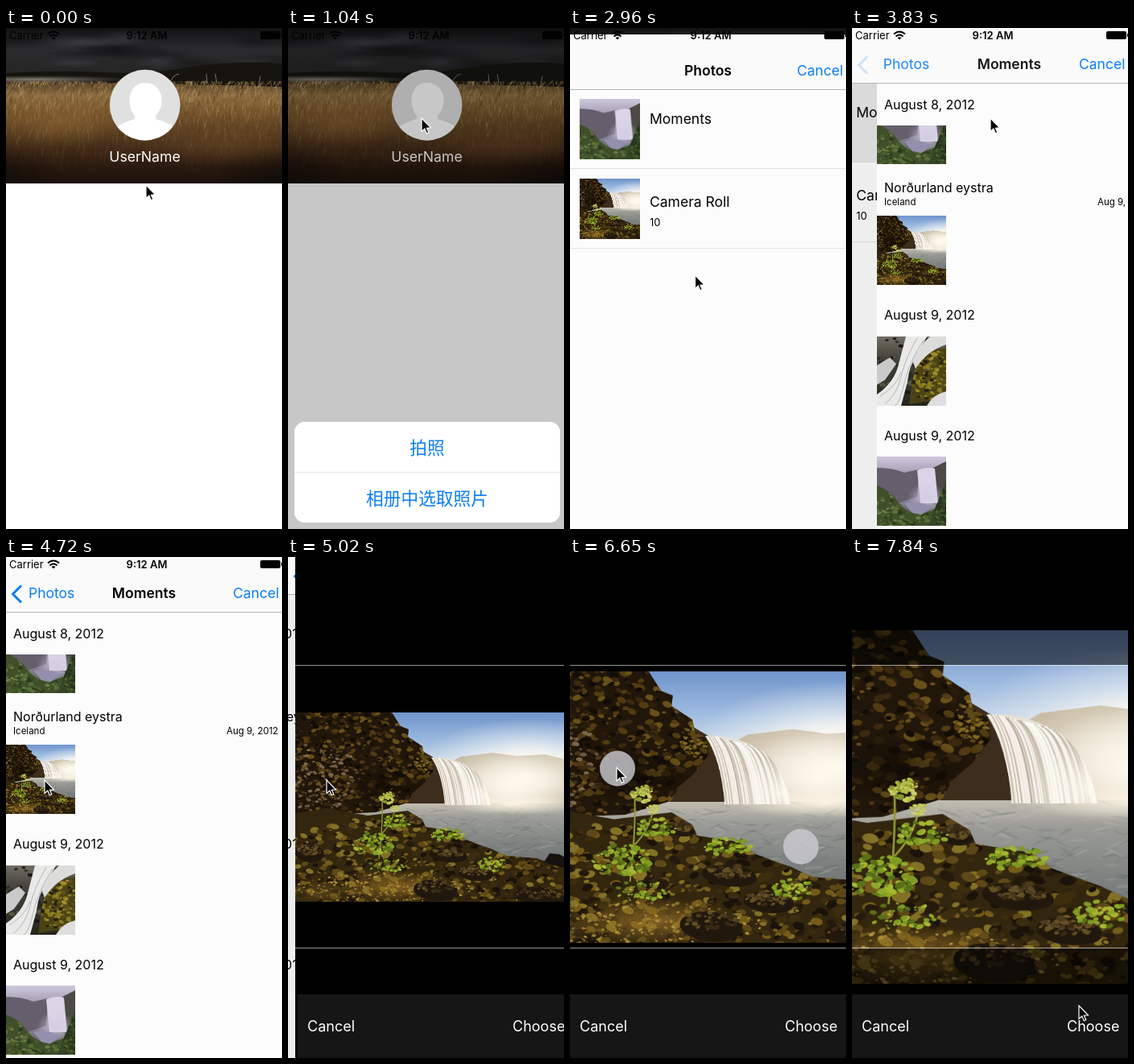
Write an HTML page with a canvas that moves like this. It is 343x622 px and loops after 7.99 s.

```html
<!DOCTYPE html>
<html lang="en">
<head>
<meta charset="utf-8">
<title>Avatar picker</title>
<style>
html, body { margin: 0; width: 100%; height: 100%; overflow: hidden; background: #fff; }
#stage { position: absolute; left: 0; top: 0; width: 343px; height: 622px; overflow: hidden; background: #fff;
  font: 400 18px/20px Inter, Roboto, sans-serif; color: #000; }
#stage * { position: absolute; box-sizing: border-box; white-space: nowrap; }
#stage svg * { position: static; }
.page { left: 0; top: 0; width: 343px; height: 622px; overflow: hidden; background: #fcfcfc; }
canvas { left: 0; }
.blue { color: #0b7df5; }
.mid { left: 0; width: 343px; text-align: center; }
.bold { font-weight: 600; }
.date { left: 9px; font-size: 16px; }
.small { font-size: 11.5px; }

#shade { left: 0; top: 0; width: 343px; height: 622px; background: #000; }
#sheet { left: 8px; top: 419px; width: 330px; height: 196px; color: #0b7df5; text-align: center;
  font: 400 21.7px/62px "Noto Sans CJK SC", "Noto Sans CJK", sans-serif; }
#sheet div { width: 330px; background: #fff; }
#sheet .box { height: 125px; border-radius: 13px; overflow: hidden; }
#row { top: 63px; height: 62px; box-shadow: 0 -1px #e6e6e6; }
#sheet .no { top: 134px; height: 61px; border-radius: 13px; font-weight: 600; }

#albums .cell { left: 0; width: 343px; height: 99px; border-bottom: 1px solid #e2e2e2; }
#nav { left: 0; top: 0; width: 343px; background: #fafafa; border-bottom: 1px solid #b4b4b4; overflow: hidden; }
#bar { left: 0; width: 343px; height: 50px; bottom: -2px; }
#bar > * { top: 15px; font-size: 17.5px; }

#crop { background: #000; }
#photo { left: 0; top: 193px; width: 343px; height: 235px; }
.veil { left: 0; width: 343px; background: rgba(0,0,0,.55); }
.rule { left: 0; width: 343px; height: 1px; background: rgba(255,255,255,.58); }
#tools { left: 0; top: 543px; width: 343px; height: 79px; background: #161616; color: #fff; }
.touch { left: -22px; top: -22px; width: 44px; height: 44px; border-radius: 50%; background: rgba(205,205,210,.8); }
</style>
</head>
<body>
<div id="stage">
  <div class="page" id="profile" style="background:#fff">
    <canvas id="field" style="top:0"></canvas>
    <svg style="left:128px;top:51px" width="90" height="90" viewBox="128 51 90 90">
      <clipPath id="disc"><circle cx="172.7" cy="95.6" r="43.8"/></clipPath>
      <g clip-path="url(#disc)">
        <path fill="#e0e0e0" d="M128 51h90v90h-90z"/>
        <path fill="#fff" d="M173 68C186 68 193.500 78 193.500 90C193.500 98 190 105 186 109V113Q203 118 208 123V141H138V123Q143 118 160 113V109C156 105 153.500 98 153.500 90C153.500 78 160 68 173 68Z"/>
      </g>
    </svg>
    <div class="mid" style="left:1px;top:150px;color:#fff;font-size:17.6px">UserName</div>
  </div>
  <div id="shade"></div>
  <div id="sheet" lang="zh-CN">
    <div class="box"><div>拍照</div><div id="row">相册中选取照片</div></div>
    <div class="no">取消</div>
  </div>

  <div class="page" id="picker">
    <div class="page" id="albums">
      <div class="cell" id="cell" style="top:68px">
        <canvas id="album1" style="left:12px;top:12px"></canvas>
        <div style="left:99px;top:27px;font-size:17.5px">Moments</div>
      </div>
      <div class="cell" style="top:167px">
        <canvas id="album2" style="left:12px;top:12px"></canvas>
        <div style="left:99px;top:31px;font-size:17.5px">Camera Roll</div>
        <div style="left:99px;top:56px;font-size:13px">10</div>
      </div>
    </div>
    <div class="page" id="moments">
      <canvas id="thumb1" style="top:83px;clip-path:inset(38px 0 0)"></canvas>
      <canvas id="thumb2" style="top:233px"></canvas>
      <canvas id="thumb3" style="top:383px"></canvas>
      <canvas id="thumb4" style="top:532px"></canvas>
      <div class="date" style="top:85px">August 8, 2012</div>
      <div class="date" style="top:188px">Norðurland eystra</div>
      <div class="small" style="left:9px;top:206px">Iceland</div>
      <div class="small" style="left:274px;top:206px">Aug 9, 2012</div>
      <div class="date" style="top:346px">August 9, 2012</div>
      <div class="date" style="top:496px">August 9, 2012</div>
    </div>
    <div id="nav"><div id="bar">
      <svg id="chevron" style="left:6px;top:14px" width="15" height="24"><path d="M13 1.500L2.500 12L13 22.500" fill="none" stroke="#0b7df5" stroke-width="3"/></svg>
      <div id="back" class="blue" style="left:28px">Photos</div>
      <div id="title1" class="mid bold">Photos</div>
      <div id="title2" class="mid bold">Moments</div>
      <div class="blue" style="left:282px">Cancel</div>
    </div></div>
  </div>

  <div id="status" style="left:0;top:-1px;width:343px;height:20px;font-size:13px">
    <div style="left:4px">Carrier</div>
    <svg style="left:51px;top:4px" width="16" height="12" fill="none" stroke="#000" stroke-width="2"><path d="M1 4.500Q8 -1.500 15 4.500M3.500 7.500Q8 3.500 12.500 7.500"/><path d="M5.500 9L8 11.500L10.500 9Q8 7.500 5.500 9Z" fill="#000" stroke="none"/></svg>
    <div class="mid bold" style="left:3.500px">9:12 AM</div>
    <div style="left:316px;top:5px;width:25px;height:10px;border-radius:2px;background:#000"></div>
    <div style="left:342px;top:8px;width:1px;height:4px;background:#000"></div>
  </div>

  <div class="page" id="crop">
    <canvas id="photo"></canvas>
    <div class="veil" style="top:0;height:134px"></div>
    <div class="veil" style="top:486px;height:57px"></div>
    <div class="rule" style="top:134px"></div>
    <div class="rule" style="top:485px"></div>
    <div id="tools">
      <div style="left:12px;top:30px">Cancel</div>
      <div style="left:267px;top:30px">Choose</div>
    </div>
  </div>
  <div class="touch" id="touch1"></div>
  <div class="touch" id="touch2"></div>
  <svg id="cursor" style="left:-2px;top:-2px" width="18" height="24" viewBox="-2 -2 18 24">
    <path d="M0 0V16.500L3.800 13L6.300 18.800L8.800 17.700L6.400 12.200L11.500 11.800Z" fill="#000" stroke="#fff" stroke-width="1.200"/>
  </svg>
</div>
<script>
const $ = id => document.getElementById(id);

// ---- painting helpers ----
let seed = 7;
const rnd = () => {
  seed = seed + 0x6D2B79F5 | 0;
  let t = Math.imul(seed ^ seed >>> 15, 1 | seed);
  t = t + Math.imul(t ^ t >>> 7, 61 | t) ^ t;
  return ((t ^ t >>> 14) >>> 0) / 4294967296;
};
const pick = list => list[Math.floor(rnd() * list.length)];

function canvas(id, w, h, scale = 1) {
  const c = $(id), g = c.getContext('2d');
  c.width = w * scale; c.height = h * scale;
  c.style.width = w + 'px'; c.style.height = h + 'px';
  g.scale(scale, scale);
  return g;
}
function ramp(g, x, y, w, h, stops) {
  const f = g.createLinearGradient(0, y, 0, y + h);
  stops.split(' ').forEach(s => { const [at, color] = s.split(':'); f.addColorStop(+at, color); });
  g.fillStyle = f;
  g.fillRect(x, y, w, h);
}
function glow(g, x, y, rx, ry, rgb, a) {
  const f = g.createRadialGradient(0, 0, 0, 0, 0, 1);
  f.addColorStop(0, `rgba(${rgb},${a})`);
  f.addColorStop(1, `rgba(${rgb},0)`);
  g.save(); g.translate(x, y); g.scale(rx, ry);
  g.fillStyle = f; g.fillRect(-1, -1, 2, 2);
  g.restore();
}
// Fills a shape, then draws details clipped to it.
function shape(g, fill, d, details) {
  const p = new Path2D(d);
  g.fillStyle = fill; g.fill(p);
  if (details) { g.save(); g.clip(p); details(); g.restore(); }
}
function specks(g, n, x, y, rx, ry, size, colors, flat = .6) {
  for (let i = 0; i < n; i++) {
    const a = rnd() * 6.283, d = Math.sqrt(rnd()), s = size * (.4 + rnd());
    g.fillStyle = pick(colors);
    g.beginPath();
    g.ellipse(x + Math.cos(a) * d * rx, y + Math.sin(a) * d * ry, s, s * flat, rnd() - .5, 0, 6.283);
    g.fill();
  }
}

function paintField(g) {
  ramp(g, 0, 0, 343, 193, '0:#121214 .14:#2b2b2e .27:#262626 .34:#2b2620 .36:#5c4a2e .43:#8b6c40 .55:#74532b .72:#4c341b .88:#2c1b10 1:#1c110b');
  for (let i = 0; i < 16; i++) glow(g, rnd() * 343, 12 + rnd() * 36, 30 + rnd() * 30, 5 + rnd() * 8, pick(['72,73,79', '14,14,16']), .45);
  shape(g, '#15140f', 'M0 56Q60 52 120 55T230 48Q290 40 343 44V73Q180 68 0 66Z');
  glow(g, 35, 64, 120, 5, '170,160,145', .75);
  for (let i = 0; i < 1900; i++) {
    const d = rnd(), x = rnd() * 343, y = 69 + d * d * 112, len = 3 + d * 9;
    g.globalAlpha = .5 * (1.05 - d);
    g.strokeStyle = pick(['#c49f62', '#a37a42', '#5a3c1b', '#3a2612', '#dcbd82']);
    g.beginPath(); g.moveTo(x, y);
    g.quadraticCurveTo(x + 1, y - len * .6, x + (rnd() - .3) * 6, y - len);
    g.stroke();
  }
  g.globalAlpha = 1;
  glow(g, 70, 118, 80, 30, '168,120,62', .35);
  glow(g, 270, 145, 110, 28, '130,90,48', .3);
  glow(g, 343, 190, 90, 42, '14,9,6', .75);
  glow(g, 0, 185, 70, 45, '18,11,7', .7);
  g.strokeStyle = 'rgba(225,215,195,.6)'; g.lineWidth = .8;
  g.stroke(new Path2D('M203 70Q207 58 215 57M250 69L249 57M262 69L260 57M313 75L316 60'));
}

function paintFalls(g) {
  ramp(g, 0, 0, 343, 120, '0:#7094cb .3:#9dbbe0 .55:#d5e0ea 1:#f4efe6');
  glow(g, 290, 60, 130, 52, '255,252,246', 1);
  shape(g, '#c5b8a0', 'M190 64L205 55L245 50L275 54L310 52L343 60V115H190Z');
  glow(g, 285, 82, 110, 44, '255,250,240', 1);
  glow(g, 268, 92, 70, 40, '255,249,238', 1);
  shape(g, '#3d2d1d', 'M138 36L172 56L182 62L190 116H138Z');
  ramp(g, 0, 113, 343, 90, '0:#c3bdb1 .2:#9b9c97 .6:#7c807e 1:#686c69');
  specks(g, 260, 230, 145, 130, 32, 6, ['rgba(200,200,195,.2)', 'rgba(80,88,88,.18)'], .12);
  glow(g, 272, 114, 85, 13, '255,246,230', .95);
  shape(g, '#e9e1d5', 'M169 56Q190 55 207 63Q234 72 243 115H186Q183 76 169 56Z', () => {
    for (let i = 0; i < 42; i++) {
      const u = i / 42 + rnd() * .02;
      g.strokeStyle = pick(['rgba(150,136,118,.4)', 'rgba(255,255,252,.75)']);
      g.beginPath(); g.moveTo(170 + u * 50, 55 + u * 12);
      g.quadraticCurveTo(181 + u * 56, 70, 186 + u * 57, 116);
      g.stroke();
    }
    glow(g, 238, 105, 42, 32, '255,250,242', .9);
  });
  shape(g, '#20160a', 'M0 0H120L131 17L141 21L140 30L158 42L160 52L170 58L172 72L160 88L146 100L140 112L100 124L0 128Z', () => {
    specks(g, 650, 80, 58, 110, 75, 3.4, ['#3a280f', '#523b12', '#120d07', '#2b1d0b', '#695019']);
    specks(g, 260, 25, 80, 55, 42, 2.2, ['#6b563d', '#45351f', '#1c140b', '#7d6749']);
    glow(g, 110, 92, 50, 22, '14,9,4', .6);
    specks(g, 90, 160, 60, 12, 14, 1.5, ['#836a20', '#5c4716']);
  });
  shape(g, '#33260e', 'M0 125L40 119L90 128L140 122L158 133L162 142L200 148L212 158L245 170L262 178L300 181L343 196V235H0Z', () => {
    specks(g, 1000, 160, 190, 200, 62, 4, ['#5e4817', '#1a1309', '#745b1a', '#3c2d0f', '#241a0c', '#837126']);
    glow(g, 125, 216, 75, 20, '156,116,40', .75);
    glow(g, 30, 222, 60, 16, '110,84,30', .6);
    specks(g, 260, 110, 218, 110, 18, 1.4, ['#9a7a30', '#6a5420', '#b0913d']);
    for (const [x, y, rx, ry] of [[174, 221, 27, 13], [308, 229, 36, 11], [150, 136, 11, 7], [190, 177, 24, 9], [18, 175, 18, 11], [224, 200, 22, 9]]) {
      g.fillStyle = '#21180d'; g.beginPath(); g.ellipse(x, y, rx, ry, .1, 0, 7); g.fill();
      specks(g, 45, x, y - ry * .4, rx * .9, ry * .6, 2.4, ['#4d3b20', '#382a15', '#655023']);
    }
  });
  shape(g, '#15120f', 'M309 186L316 175L328 176L343 184V196Z');
  const leaf = ['#7d9a22', '#a5b631', '#587019', '#8fa82a'];
  g.strokeStyle = '#8f9a35'; g.lineWidth = 1.4;
  g.stroke(new Path2D('M104 182Q109 140 108 108M108 150Q120 138 124 120'));
  specks(g, 75, 115, 106, 10, 7, 1.7, ['#b3bd48', '#8b992c', '#cdd06a']);
  specks(g, 28, 124, 119, 5, 4, 1.3, ['#b3bd48', '#cdd06a']);
  specks(g, 80, 97, 164, 25, 14, 2.8, leaf);
  specks(g, 42, 126, 135, 19, 8, 2.2, leaf);
  specks(g, 55, 188, 151, 20, 8, 2.1, leaf);
  specks(g, 45, 245, 188, 18, 9, 2, leaf);
  specks(g, 40, 113, 190, 22, 10, 2, leaf);
}

function paintCascade(g) {
  ramp(g, 0, 0, 86, 86, '0:#716d64 .3:#46443b 1:#25251c');
  specks(g, 120, 43, 40, 50, 45, 3, ['#2a2a20', '#57543e', '#191912']);
  shape(g, '#4b4216', 'M50 32L66 18L86 14V72L66 80L40 84L44 55Z', () =>
    specks(g, 170, 66, 48, 24, 36, 2.6, ['#8a7a1f', '#5e5519', '#26220f', '#a18d2b']));
  shape(g, '#e9e9e8', 'M36 0H62L50 22Q40 36 38 56L30 86H0V72Q20 58 26 38Z');
  shape(g, '#dcdcdb', 'M66 0H86V10Q62 18 48 40L44 30Q54 10 66 0Z');
  shape(g, '#c9cac9', 'M0 36L16 26L24 34L10 54L0 60Z');
  shape(g, '#dedede', 'M62 86Q70 72 86 68V86Z');
  g.strokeStyle = 'rgba(130,132,135,.5)';
  g.stroke(new Path2D('M50 2Q34 30 30 50T10 84M58 4Q40 32 34 58T22 86M4 74Q24 62 30 44'));
}

function paintGorge(g) {
  ramp(g, 0, 0, 86, 86, '0:#cfc9de .25:#a39cb2 .6:#8d87a0 1:#3b4a2a');
  shape(g, '#655e6c', 'M0 14Q20 14 34 20L52 16L50 50L20 60L0 50Z');
  shape(g, '#4c4a45', 'M70 14L86 6V66L70 58Z');
  shape(g, '#d9d4e6', 'M50 17Q62 12 72 15L76 58H54Z');
  glow(g, 62, 52, 24, 20, '210,204,226', .8);
  shape(g, '#3f4f2a', 'M0 36Q16 42 26 56T54 72L86 60V86H0Z', () =>
    specks(g, 190, 40, 70, 50, 28, 2.6, ['#587036', '#2b3a1c', '#47602a', '#6a7a44']));
  shape(g, '#958fae', 'M34 58Q48 54 68 62L56 72L44 70Z');
  shape(g, '#354626', 'M86 30L74 60L64 86H86Z', () =>
    specks(g, 60, 80, 62, 14, 26, 2.4, ['#4f6a30', '#26351a']));
}

paintField(canvas('field', 343, 193, 1));
paintFalls(canvas('photo', 343, 235, 2));
$('photo').style.cssText = '';
const copyFalls = (id, size) => canvas(id, size, size).drawImage($('photo'), 108, 0, 470, 470, 0, 0, size, size);
copyFalls('thumb2', 86);
copyFalls('album2', 75);
paintCascade(canvas('thumb3', 86, 86));
paintGorge(canvas('thumb4', 86, 86));
canvas('thumb1', 86, 86).drawImage($('thumb4'), 0, 0);
canvas('album1', 75, 75).drawImage($('thumb4'), 0, 0, 75, 75);

// ---- timing: ticks of 150 ms, some of 140 ms ----
const shortTicks = new Set([1, 10, 15, 19, 22, 23, 24, 26, 34, 44, 51]);
const starts = [];
let total = 0;
for (let k = 0; k < 54; k++) { starts.push(total); total += shortTicks.has(k) ? 140 : 150; }

// Rows are [tick, ...values]; values ease between rows and hold outside them.
const track = (...rows) => k => {
  const i = rows.findIndex(r => r[0] > k);
  if (i < 1) return rows.at(i).slice(1);
  const a = rows[i - 1], b = rows[i], u = (k - a[0]) / (b[0] - a[0]), e = u * u * (3 - 2 * u);
  return a.slice(1).map((v, j) => v + (b[j + 1] - v) * e);
};
const cursorAt = track([0, 174, 195], [2, 166, 112], [8, 166, 112], [11, 139, 502], [18, 139, 502], [22, 172, 112],
  [27, 172, 112], [32, 48, 277], [35, 48, 277], [39, 91, 276], [42, 91, 276], [48, 25, 247], [53, 282, 557]);
const sheetAt = track([6, 203, 0], [7, 70, .22], [8, 4, .38], [9, 0, .4], [12, 0, .4], [13, 110, .12], [14, 203, .012]);
const pickerAt = track([17, 622], [18, 330], [19, 60], [20, 8], [21, 0]);
const momentsAt = track([24, 343], [25, 190], [26, 31], [27, 0]);
const cropAt = track([32, 343], [33, 130], [34, 9], [35, 0]);
const zoomAt = track([42, 1], [48, 1.87]);

const move = (id, x, y = 0) => $(id).style.transform = `translate(${x}px,${y}px)`;
const fade = (id, a) => $(id).style.opacity = a;
const dim = (id, p) => $(id).style.filter = `brightness(${1 - .063 * p})`;

function show(k) {
  const [cx, cy] = cursorAt(k), [sheetY, shade] = sheetAt(k), [modalY] = pickerAt(k);
  const [mx] = momentsAt(k), [px] = cropAt(k), [zoom] = zoomAt(k);
  const p = 1 - mx / 343, q = 1 - px / 343;

  move('cursor', cx, cy);
  move('sheet', 0, sheetY);
  fade('shade', shade);
  $('row').style.background = k === 12 ? '#e4e4e4' : '#fff';

  move('picker', 0, modalY);
  move('albums', -103 * p);
  dim('albums', p);
  $('cell').style.background = k >= 25 ? '#e7e7e7' : 'none';
  move('moments', mx - 103 * q);
  dim('moments', q);

  $('nav').style.height = (k >= 33 ? 47 : 69) + 'px';
  move('back', 120 * (1 - p));
  fade('back', p);
  fade('chevron', p ** 18);
  move('title1', -110 * p);
  fade('title1', (1 - p) ** 2);
  move('title2', 265 * (1 - p));
  fade('title2', p);
  fade('status', k < 33 ? 1 : 0);

  move('crop', px);
  move('tools', px / 3);
  $('photo').style.transform = `scale(${zoom})`;
  const pinching = k >= 40 && k <= 48 ? 1 : 0;
  fade('touch1', pinching);
  fade('touch2', pinching);
  move('touch1', cx + 1, cy + 1);
  move('touch2', 345 - cx, 621 - cy);
}

const t0 = performance.now();
function tick() {
  const t = (performance.now() - t0) % total;
  show(starts.findLastIndex(s => s <= t));
  requestAnimationFrame(tick);
}
tick();
</script>
</body>
</html>
```
